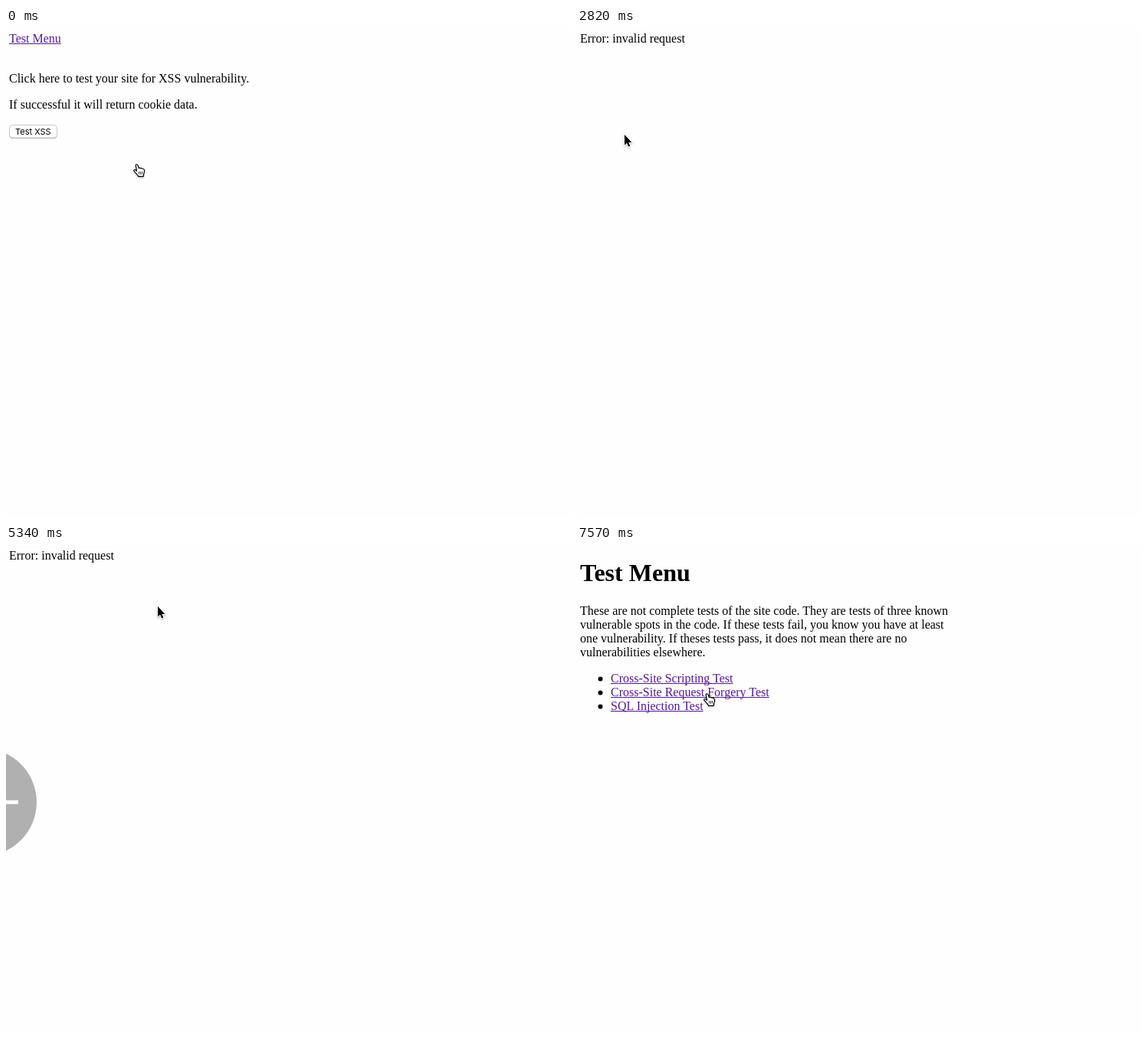
An HTML page that plays this animation: 737x637 px, repeating every 8 s.

```html
<!DOCTYPE html>
<html lang="en">
<head>
<meta charset="utf-8">
<title>Test pages</title>
<style>
  html, body { margin: 0; width: 100%; height: 100%; overflow: hidden; background: #fefefe; }
  svg { display: block; width: 737px; height: 637px; }
  text { font: 16px "Liberation Serif", "Times New Roman", serif; white-space: pre; }
  .title { font-size: 32px; font-weight: bold; }
  .link { fill: #551a8b; }
  .label { font: 11px Inter, "Liberation Sans", sans-serif; }
</style>
</head>
<body>
<svg viewBox="0 0 737 637">
  <defs>
    <linearGradient id="blue" x2="0" y2="1">
      <stop stop-color="#6cb3fa"/><stop offset="1" stop-color="#0a6cf5"/>
    </linearGradient>
    <filter id="shade" x="-50%" y="-50%" width="200%" height="200%">
      <feDropShadow dx="0" dy="1" stdDeviation="0.8" flood-opacity="0.35"/>
    </filter>
  </defs>
  <rect width="737" height="637" fill="#fefefe"/>

  <g id="form">
    <rect x="4.5" y="127.5" width="62" height="16.5" rx="4" fill="#ababab"/>
    <rect id="button" x="4.5" y="126.5" width="62" height="16.5" rx="4" fill="#fff" stroke="#c6c6c6"/>
    <text id="label" class="label" x="12" y="139">Test XSS</text>
  </g>
  <g id="error">
    <rect id="selection" y="5" height="18" fill="#b3d4fd"/>
  </g>
  <g id="menu"></g>

  <g id="swipe">
    <circle cy="335" r="70"/>
    <path d="M24 321L10 335L24 349M11 335H46" fill="none" stroke="#fff" stroke-width="5"/>
  </g>

  <g id="cursor">
    <path id="arrow" filter="url(#shade)" d="M0 0V13.4L3 10.7L5.2 15.4L7.3 14.5L5.2 9.9H9.4Z"
      stroke="#fff" stroke-width="1.6" paint-order="stroke"/>
    <g id="hand" transform="translate(-5 -1)" stroke="#000" stroke-width="1.15" stroke-linejoin="round" filter="url(#shade)">
      <path fill="#fff" d="M3.2 1.6C3.6 .4 5.3 .4 5.9 1.8L7.3 5.6C8.2 4.9 9.3 5.1 9.8 6C10.7 5.4 11.8 5.7 12.2 6.6
        C13.4 6.3 14.4 7 14.5 8.3C14.6 10 14.4 11.6 13.6 13L13.2 16.3H6.6C6.3 14.5 4.6 13.6 3.3 12L.9 9.2
        C.2 8.2 1.4 7 2.6 7.7L4.6 9.3Z"/>
      <path fill="none" stroke-width=".8" d="M7.6 10V13.6M9.6 10V13.6M11.6 10V13.6"/>
    </g>
    <g id="beam" fill="none">
      <path stroke="#fff" stroke-width="2.4" stroke-opacity=".7" d="M.5 -6V6"/>
      <path stroke="#000" d="M-3 -7.5Q.2 -7.5 .5 -6Q.8 -7.5 4 -7.5M.5 -6V6M-3 7.5Q.2 7.5 .5 6Q.8 7.5 4 7.5M-1.5 3.5H2.5"/>
    </g>
  </g>
</svg>
<script>
const LOOP = 8000, TICKS = 54;
const $ = id => document.getElementById(id);
const zones = { form: [], error: [], menu: [] };

function add(parent, tag, attrs) {
  const el = document.createElementNS("http://www.w3.org/2000/svg", tag);
  for (const key in attrs) el.setAttribute(key, attrs[key]);
  return parent.appendChild(el);
}

// Places a line and remembers its area, which decides the pointer shape.
function line(page, x, y, str, kind = "") {
  const el = add($(page), "text", { x, y, class: kind });
  el.textContent = str;
  const w = el.getComputedTextLength();
  if (kind === "link") add($(page), "rect", { x, y: y + 1, width: w, height: 1, class: "link" });
  const top = kind === "title" ? y - 29 : y - 14;
  zones[page].push({ x, w, top, bottom: kind === "title" ? y + 8 : y + 4, shape: kind === "link" ? "hand" : "beam" });
}

line("form", 4, 19, "Test Menu", "link");
line("form", 4, 71, "Click here to test your site for XSS vulnerability.");
line("form", 4, 105, "If successful it will return cookie data.");
line("error", 4, 19, "Error: invalid request");
line("menu", 4, 47, "Test Menu", "title");
[
  "These are not complete tests of the site code. They are tests of three known",
  "vulnerable spots in the code. If these tests fail, you know you have at least",
  "one vulnerability. If theses tests pass, it does not mean there are no",
  "vulnerabilities elsewhere."
].forEach((str, i) => line("menu", 4, 91 + 18 * i, str));
["Cross-Site Scripting Test", "Cross-Site Request Forgery Test", "SQL Injection Test"].forEach((str, i) => {
  line("menu", 44, 179 + 18 * i, str, "link");
  add($("menu"), "circle", { cx: 30.5, cy: 174.5 + 18 * i, r: 3 });
});

// Pointer path: tick, x, y
const path = [
  [1, 171, 178], [3, 244, 190], [4, 225, 165], [6, 85, 88], [7, 60, 87], [9, 156, 160],
  [11, 36, 40], [12, 40, 78], [14, 62, 139], [19, 62, 139], [20, 75, 150], [22, 125, 120],
  [25, 150, 70], [26, 150, 70], [28, 140, 14], [30, 40, 8], [32, 205, 78], [33, 198, 80],
  [38, 198, 80], [41, 64, 16], [43, 62, 13], [44, 62, 13], [45, 77, 54],
  [48, 135, 130], [50, 172, 195], [51, 170, 194]
];

function pointerAt(tick) {
  const i = path.findIndex(p => p[0] >= tick);
  if (i < 0) return path[path.length - 1].slice(1);
  if (i === 0) return path[0].slice(1);
  const a = path[i - 1], b = path[i], k = (tick - a[0]) / (b[0] - a[0]);
  return [a[1] + (b[1] - a[1]) * k, a[2] + (b[2] - a[2]) * k].map(Math.round);
}

function shapeAt(page, tick, x, y) {
  if (tick < 2) return "hand";
  const hit = zones[page].find(z => x >= z.x && x <= z.x + z.w && y >= z.top && y < z.bottom);
  return hit ? hit.shape : "arrow";
}

const show = (id, on) => $(id).setAttribute("display", on ? "inline" : "none");

function render(ms) {
  // The small offset absorbs rounding of the tick times.
  const tick = Math.floor((ms % LOOP) * TICKS / LOOP + 0.05);
  const page = tick >= 45 ? "menu" : tick >= 19 && tick < 38 ? "error" : "form";
  for (const id in zones) show(id, id === page);

  const pressed = tick === 15;
  $("button").setAttribute("fill", pressed ? "url(#blue)" : "#fff");
  $("label").setAttribute("fill", pressed ? "#fff" : "#000");

  const [x, y] = pointerAt(tick);
  const selecting = tick >= 28 && tick < 32;
  const start = Math.min(141, Math.max(42, x));
  $("selection").setAttribute("x", start);
  $("selection").setAttribute("width", selecting ? 141 - start : 0);

  show("swipe", tick === 36 || tick === 37);
  $("swipe").setAttribute("transform", `translate(${tick === 36 ? -30 : 0} 0)`);
  $("swipe").setAttribute("opacity", tick === 36 ? 0.3 : 0.5);

  const shape = shapeAt(page, tick, x, y);
  for (const id of ["arrow", "hand", "beam"]) show(id, id === shape);
  $("cursor").setAttribute("transform", `translate(${x} ${y})`);
}

const origin = performance.now();
function loop() {
  render(performance.now() - origin);
  requestAnimationFrame(loop);
}
loop();
</script>
</body>
</html>
```
